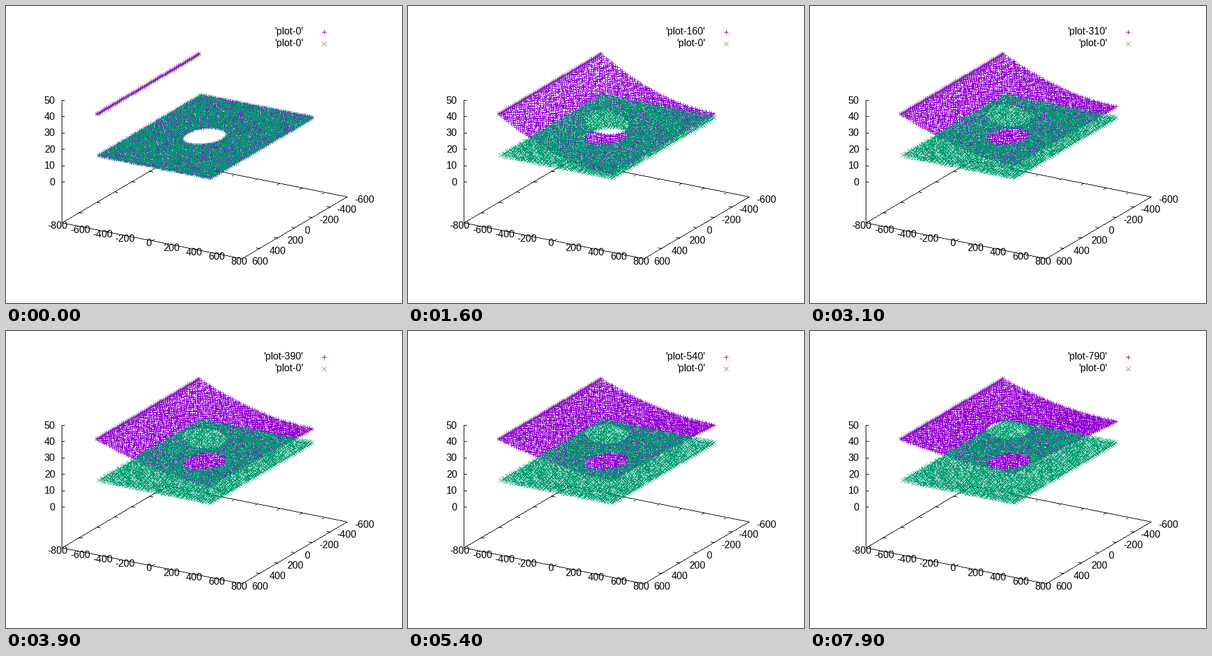
These frames come from a looping animation (640 by 480 pixels, 8 s). A matplotlib script:

```python
import numpy as np
import matplotlib.pyplot as plt
from matplotlib.animation import FuncAnimation

W, H, DPI = 640, 480, 80
FRAMES, STEP_MS = 80, 100
PURPLE, GREEN, GREY, BLACK = (148, 0, 211), (0, 158, 115), (112, 118, 115), (0, 0, 0)
HALF_X, HALF_Y, HOLE = 503, 582, 165
COLD, HOT = 20, 45
RATE = 0.083  # dimensionless diffusion time per second


def project(x, y, z=-25):
    u, v = (x + 800) / 1600, (600 - y) / 1200
    return 90 + 291 * u + 170 * v, 350 + 58 * u - 100 * v - 2.64 * (z + 25)


def make_nodes():
    """Slightly irregular grid over a plate with a round hole."""
    rng = np.random.default_rng(4)
    nx, ny = 48, 55
    gx, gy = np.meshgrid(np.linspace(-HALF_X, HALF_X, nx),
                         np.linspace(-HALF_Y, HALF_Y, ny))
    gx[:, 2:-1] += rng.uniform(-6.5, 6.5, (ny, nx - 3))
    gy[1:-1, 1:-1] += rng.uniform(-6.5, 6.5, (ny - 2, nx - 2))
    keep = np.hypot(gx, gy) > HOLE + 6
    a = np.linspace(0, 2 * np.pi, 50, endpoint=False)
    return (np.r_[gx[keep], HOLE * np.cos(a)],
            np.r_[gy[keep], HOLE * np.sin(a)])


X, Y = make_nodes()
FIXED = X < -HALF_X + 1
DEPTH = (X + HALF_X) / (2 * HALF_X)
LOSS = 0.08 + 1.2 * ((HALF_Y - Y) / (2 * HALF_Y)) ** 2


def heat(t):
    """Height of every node t seconds after the hot edge is switched on."""
    if t == 0:
        return np.where(FIXED, HOT, COLD)
    m = np.sqrt(LOSS)
    u = np.cosh(m * (1 - DEPTH)) / np.cosh(m)
    for n in range(25):
        lam = (n + 0.5) * np.pi
        k = lam ** 2 + LOSS
        u -= 2 * lam / k * np.sin(lam * DEPTH) * np.exp(-k * RATE * t)
    return COLD + (HOT - COLD) * u


ARM = np.arange(-3, 4)
ZERO = np.zeros(7, int)
PLUS = np.r_[ARM, ZERO], np.r_[ZERO, ARM]
CROSS = np.r_[ARM, ARM], np.r_[ARM, -ARM]


def stamp(img, px, py, shape, color):
    px, py = (np.atleast_1d(np.rint(p).astype(int)) for p in (px, py))
    img[py[:, None] + shape[1], px[:, None] + shape[0]] = color


def line(img, p, q):
    n = int(max(abs(q[0] - p[0]), abs(q[1] - p[1])) + 1.5)
    xs, ys = (np.rint(np.linspace(p[i], q[i], n)).astype(int) for i in (0, 1))
    img[ys, xs] = BLACK


def tick(img, p, dx, dy):
    line(img, p, (p[0] + dx, p[1] + dy))


def draw_axes(img):
    corners = [project(*c) for c in ((-800, 600), (800, 600), (800, -600), (-800, -600))]
    for p, q in zip(corners, corners[1:] + corners[:1]):
        line(img, p, q)
    line(img, (90, 152), (90, 350))
    for x in range(-800, 801, 200):
        tick(img, project(x, 600), 4, -2.4)
        tick(img, project(x, -600), -4, 2.4)
    for y in range(-600, 601, 200):
        tick(img, project(800, y), -5, -1)
        tick(img, project(-800, y), 5, 1)
    for z in range(0, 51, 10):
        tick(img, project(-800, 600, z), 4, 0)


base = np.full((H, W, 3), 255, np.uint8)
draw_axes(base)
stamp(base, 514, 42, PLUS, PURPLE)
stamp(base, 514, 61, CROSS, GREY)

fig = plt.figure(figsize=(W / DPI, H / DPI), dpi=DPI, facecolor="white")
ax = fig.add_axes([0, 0, 1, 1])
view = ax.imshow(base, extent=(0, W, H, 0), aspect="auto", interpolation="nearest")
ax.set(xlim=(0, W), ylim=(H, 0))
ax.axis("off")


def label(x, y, s, ha):
    return ax.text(x, y, s, ha=ha, va="baseline", family="Liberation Sans",
                   size=16 * 72 / DPI, color="black")


# Non-negative numbers leave room for a sign.
for x in range(-800, 801, 200):
    px, py = project(x, 600)
    label(px - 6.5 + 2.2 * (x >= 0), py + 9.5, str(x), "center")
for y in range(-600, 601, 200):
    px, py = project(800, y)
    label(px + 12 + 4.4 * (y >= 0), py + 9.5, str(y), "left")
for z in range(0, 51, 10):
    label(79.5, project(-800, 600, z)[1] + 5.5, str(z), "right")
title = label(480, 46, "'plot-0'", "right")
label(480, 65, "'plot-0'", "right")

cold_x, cold_y = project(X, Y, heat(0))


def update(i):
    img = base.copy()
    px, py = project(X, Y, heat(i * STEP_MS / 1000))
    stamp(img, cold_x[FIXED], cold_y[FIXED], CROSS, GREY)
    stamp(img, px, py, PLUS, PURPLE)
    stamp(img, cold_x[~FIXED], cold_y[~FIXED], CROSS, GREEN)
    view.set_data(img)
    title.set_text(f"'plot-{10 * i}'")
    return view, title


anim = FuncAnimation(fig, update, frames=FRAMES, interval=STEP_MS,
                     repeat=True, repeat_delay=0)
plt.show()
```
